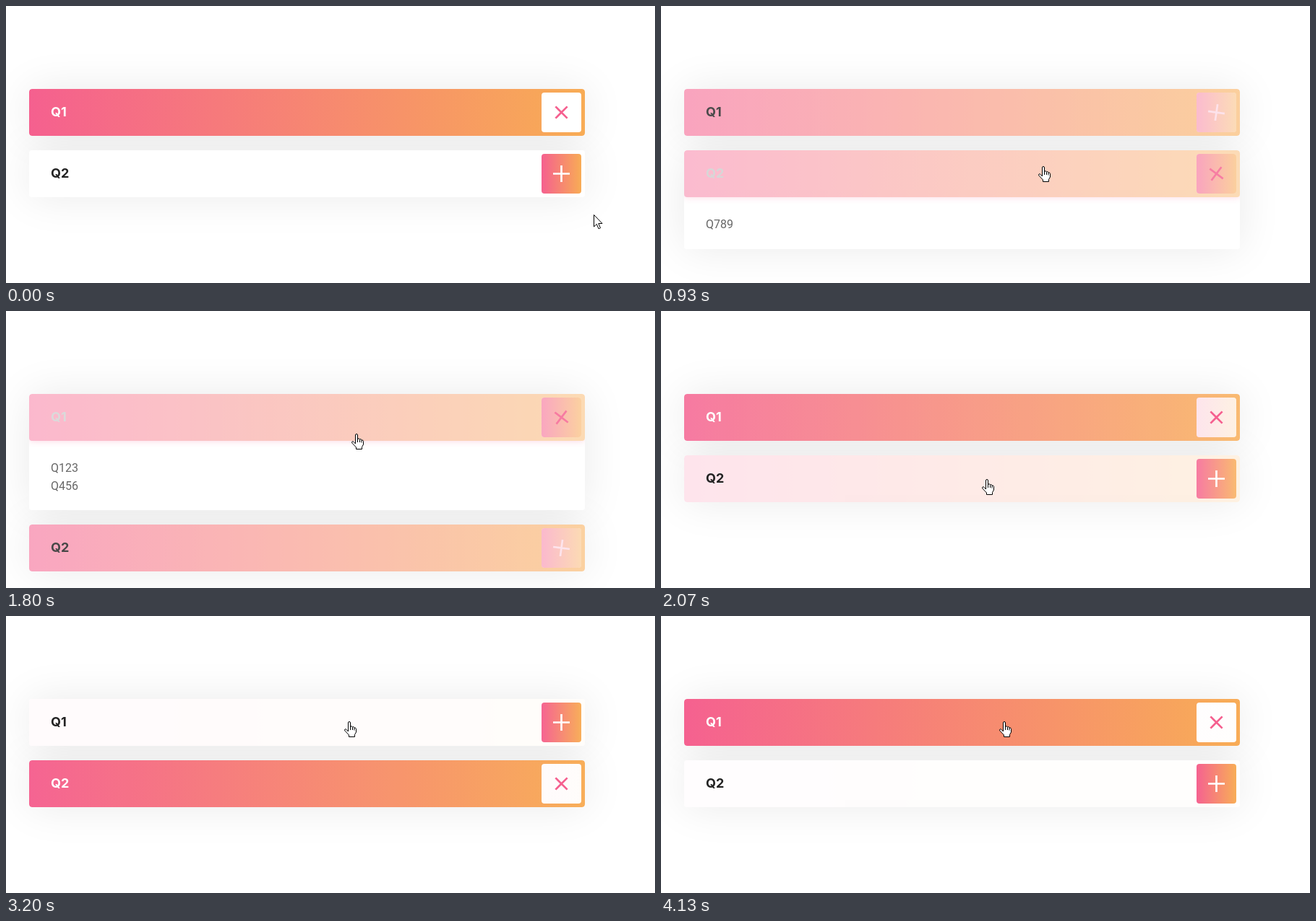
An HTML page for the animation above (4190 ms loop, 898 by 384 pixels).

```html
<!DOCTYPE html>
<html lang="en">
<head>
<meta charset="utf-8">
<title>Accordion</title>
<style>
  html, body { margin: 0; width: 100%; height: 100%; overflow: hidden; background: #fff; }
  #stage { position: relative; width: 898px; height: 384px; overflow: hidden; }
  .shade, .card { position: absolute; left: 32px; width: 769px; border-radius: 4px; }
  .shade { box-shadow: 0 0 60px rgba(0, 0, 0, .085); }
  .card { background: #fff; overflow: hidden; }
  .tint { position: absolute; inset: 0; background: linear-gradient(to right, #f5608f, #f8ac55); border-radius: 4px; }
  .bar { position: absolute; left: 0; top: 0; width: 769px; height: 65px; }
  .bar > .tint { box-shadow: 0 0 10px rgba(245, 96, 143, .6); }
  .title { position: absolute; left: 30px; top: 0; font: 700 18px/64px Poppins, Inter, sans-serif; }
  .button { position: absolute; left: 709px; top: 5px; width: 55px; height: 55px; background: #fff; border-radius: 4px; }
  .button svg { position: absolute; left: 0; top: 0; }
  .panel { position: absolute; left: 30px; top: 90px; font: 16px/25px Roboto, sans-serif; color: #666; }
  #pointer { position: absolute; left: 0; top: 0; overflow: visible; }
  #pointer path { fill: #fff; stroke: #000; stroke-linejoin: round; }
</style>
</head>
<body>
<div id="stage">
  <svg id="pointer" width="20" height="24">
    <path id="arrow" d="M.5 .5V17L4.3 13.4L7 19.8L9.5 18.7L6.8 12.5H12Z"/>
    <path id="hand" d="M5.5 14V2Q5.5 .5 7 .5T8.5 2V8Q9 6.5 10.2 6.8T11.5 8.5Q12 7.2 13 7.6T14 9.5Q15 8.4 16 9.4T16.5 12V15L14.5 18.5V21.5H6.5V19L1 13.2Q0 11.8 1.2 10.9T3.5 12ZM8.5 8V12M11.5 8.5V12M14 9.5V12.5"/>
  </svg>
</div>
<script>
const LOOP = 4190, STEP = 200 / 3;
const BAR = 65, GAP = 20, TOP = 115;
const FADE = 1000, TURN = 500, SLIDE = 350;
const WHITE = [255, 255, 255], DARK = [34, 34, 34], PINK = [245, 96, 143];

// Times at which a card is clicked, and which one.
const clicks = [[-LOOP, 0], [675, 1], [1535, 0], [2405, 1], [3277, 0]];

// Pointer tip: time, x, y.
const route = [
  [0, 813, 289], [130, 770, 262], [270, 680, 222], [400, 580, 198], [530, 528, 222],
  [1130, 528, 222], [1330, 512, 185], [1480, 494, 151],
  [1740, 494, 151], [2000, 451, 232], [2400, 447, 235],
  [2750, 447, 235], [3130, 474, 146], [LOOP, 474, 146]
];

const stage = document.getElementById('stage');
const pointer = document.getElementById('pointer');
const arrow = document.getElementById('arrow');
const hand = document.getElementById('hand');

function addBox(className, html = '') {
  const box = document.createElement('div');
  box.className = className;
  box.innerHTML = html;
  stage.insertBefore(box, pointer);
  return box;
}

function makeCard(title, lines, shade) {
  const root = addBox('card', `
    <div class="panel">${lines.join('<br>')}</div>
    <div class="bar">
      <div class="tint"></div>
      <div class="title">${title}</div>
      <div class="button"><div class="tint"></div>
        <svg width="55" height="55"><path d="M16 27.5H39M27.5 16V39" stroke-width="2.7"/></svg>
      </div>
    </div>`);
  const find = selector => root.querySelector(selector);
  return {
    root, shade, fullHeight: 50 + 25 * lines.length,
    title: find('.title'), icon: find('path'),
    barTint: find('.bar > .tint'), buttonTint: find('.button > .tint')
  };
}

const shades = [addBox('shade'), addBox('shade')];
const cards = [
  makeCard('Q1', ['Q123', 'Q456'], shades[0]),
  makeCard('Q2', ['Q789'], shades[1])
];

const bezier = (a, b, u) => 3 * a * u * (1 - u) ** 2 + 3 * b * u * u * (1 - u) + u ** 3;

// Standard CSS "ease" curve.
function ease(x) {
  if (x <= 0) return 0;
  if (x >= 1) return 1;
  let low = 0, high = 1;
  for (let i = 0; i < 24; i++) {
    const mid = (low + high) / 2;
    if (bezier(.25, .25, mid) < x) low = mid; else high = mid;
  }
  return bezier(.1, 1, low);
}

const mix = (a, b, k) => a + (b - a) * k;
const blend = (a, b, k) => `rgb(${a.map((v, i) => Math.round(mix(v, b[i], k))).join()})`;

function pointerAt(t) {
  const i = Math.max(1, route.findIndex(p => p[0] >= t));
  const [t0, x0, y0] = route[i - 1], [t1, x1, y1] = route[i];
  const k = (t - t0) / (t1 - t0);
  return [Math.round(mix(x0, x1, k)), Math.round(mix(y0, y1, k))];
}

function drawCard(card, top, height, fade, turn) {
  for (const el of [card.root, card.shade]) {
    el.style.top = top + 'px';
    el.style.height = BAR + height + 'px';
  }
  card.barTint.style.opacity = fade;
  card.buttonTint.style.opacity = 1 - fade;
  card.title.style.color = blend(DARK, WHITE, turn);
  card.icon.setAttribute('stroke', blend(WHITE, PINK, turn));
  card.icon.setAttribute('transform', `rotate(${45 * turn} 27.5 27.5)`);
}

function draw(t) {
  const [start, active] = clicks.filter(c => c[0] <= t).pop();
  const age = t - start;
  const tops = [];
  let top = TOP;
  cards.forEach((card, i) => {
    const toward = duration => {
      const k = ease(age / duration);
      return i === active ? k : 1 - k;
    };
    // The panel vanishes as soon as it has slid open.
    const height = i === active && age < SLIDE ? card.fullHeight * ease(age / SLIDE) : 0;
    drawCard(card, top, height, toward(FADE), toward(TURN));
    tops.push(top);
    top += BAR + height + GAP;
  });

  const [x, y] = pointerAt(t);
  const over = x < 801 && tops.some(v => y >= v && y < v + BAR);
  hand.style.display = over ? '' : 'none';
  arrow.style.display = over ? 'none' : '';
  pointer.style.transform = `translate(${over ? x - 6 : x}px, ${y}px)`;
}

const origin = performance.now();
function tick() {
  const t = (performance.now() - origin) % LOOP;
  draw(Math.min(62, Math.floor((t + 3.4) / STEP)) * STEP);
  requestAnimationFrame(tick);
}
tick();
</script>
</body>
</html>
```
